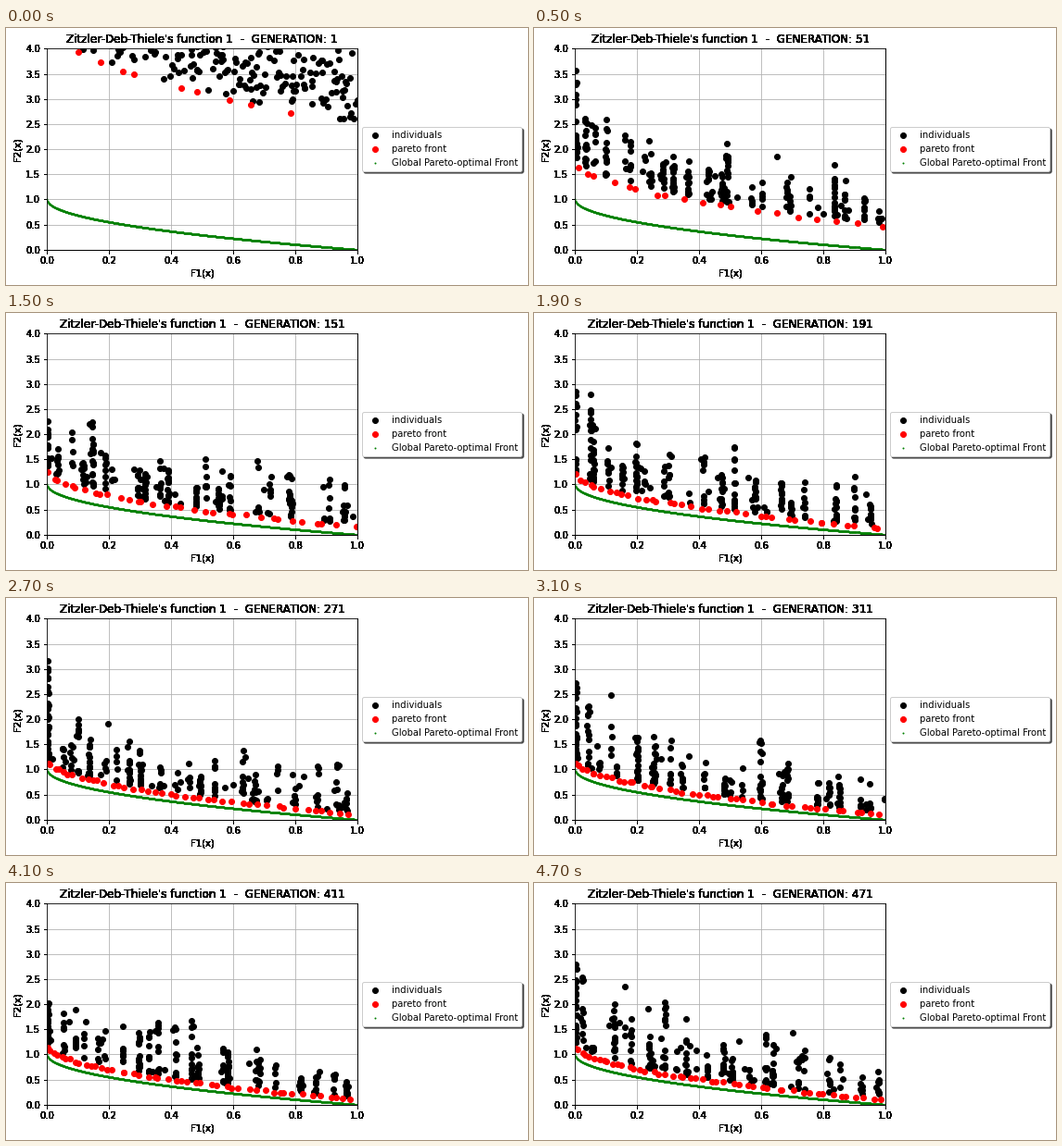
Write a matplotlib script that moves like this. It is 563 px wide and 278 px high and loops after 4.8 s.

```python
import numpy as np
import matplotlib.pyplot as plt
from matplotlib.animation import FuncAnimation

W, H, DPI = 563, 278, 72
FRAMES, STEP = 48, 10
POP, NICHES = 235, 22


def zdt1(x, g):
    return g - np.sqrt(g * x)


def best_g(age):
    """Distance factor of the best individuals, settling near 1."""
    return 1.165 + 2.4 * np.exp(-age / 18) + 1.035 * np.exp(-age / 62)


def strata(rng, n, power):
    """Sorted values over 0..1, one per stratum, denser near 0."""
    return ((np.arange(n) + rng.random(n)) / n) ** power


def population(gen):
    """Individuals and Pareto front of one generation."""
    rng = np.random.default_rng(gen)
    age = gen - 1
    g = best_g(age)
    fresh = np.exp(-age / 15)

    # Individuals start scattered and gather in columns of equal F1.
    cols = strata(rng, NICHES, 1.2)
    cols[0] = 0.003
    share = rng.uniform(0.4, 1.6, NICHES) * (1.3 - 0.5 * cols)
    share[0] *= 1.8
    pick = rng.choice(NICHES, POP, p=share / share.sum())
    drift = np.where(rng.random(POP) < 0.2, 0.006, 0.001)
    x = cols[pick] + rng.normal(0, 1, POP) * drift
    loose = rng.random(POP) < np.maximum(fresh, 0.05)
    x = np.clip(np.where(loose, rng.random(POP), x), 0, 1)

    reach = rng.uniform(0.5, 2, NICHES) * (1 - 0.2 * cols)
    lift = 0.12 + reach[pick] * rng.random(POP) ** 1.5
    early = np.maximum(rng.normal(0.9, 0.43, POP), 0.13)
    lift += fresh * (early - lift)
    crowd = x, zdt1(x, g + lift)

    # The front fills up and reaches both ends.
    n = int(9 + 42 * (1 - np.exp(-age / 170)))
    fx = 0.1 * fresh + (1 - 0.25 * fresh) * strata(rng, n, 1.3)
    fy = zdt1(fx, g + rng.uniform(0, 0.05, n))
    return crowd, (fx, np.minimum.accumulate(fy))


def harden(artist, times=20):
    """Paint repeatedly so soft edges turn solid."""
    draw = artist.draw

    def repeat(renderer):
        for _ in range(times):
            draw(renderer)

    artist.draw = repeat


plt.rcParams["font.family"] = "DejaVu Sans"
fig = plt.figure(figsize=(W / DPI, H / DPI), dpi=DPI, facecolor="white")
ax = fig.add_axes([44.2 / W, 38.2 / H, 334.8 / W, 217.44 / H])

crowd_dots, = ax.plot([], [], "o", color="black", label="individuals")
front_dots, = ax.plot([], [], "o", color="red", label="pareto front")
curve = np.linspace(0, 1, 1000)
ax.plot(curve, 1 - np.sqrt(curve), "o", color="green", markersize=1,
        label="Global Pareto-optimal Front")

ax.set(xlim=(0, 1), ylim=(0, 4), xlabel="F1(x)", ylabel="F2(x)",
       xticks=np.linspace(0, 1, 6), yticks=np.linspace(0, 4, 9))
ax.grid(True)
title = ax.set_title("")
ax.legend(loc="center left", bbox_to_anchor=(1, 0.5), fancybox=True,
          shadow={"ox": 2, "oy": -2, "alpha": 1})

for axis in (ax.xaxis, ax.yaxis):
    harden(axis.label)
    for tick in axis.get_major_ticks():
        harden(tick.label1)
        harden(tick.tick1line)
for artist in (title, ax.spines["right"], ax.spines["bottom"]):
    harden(artist)


def update(i):
    gen = 1 + STEP * i
    crowd, front = population(gen)
    crowd_dots.set_data(*crowd)
    front_dots.set_data(*front)
    title.set_text(f"Zitzler-Deb-Thiele's function 1  -  GENERATION: {gen}")
    return crowd_dots, front_dots, title


anim = FuncAnimation(fig, update, frames=FRAMES, interval=100,
                     repeat=True, repeat_delay=0, blit=False)
plt.show()
```
